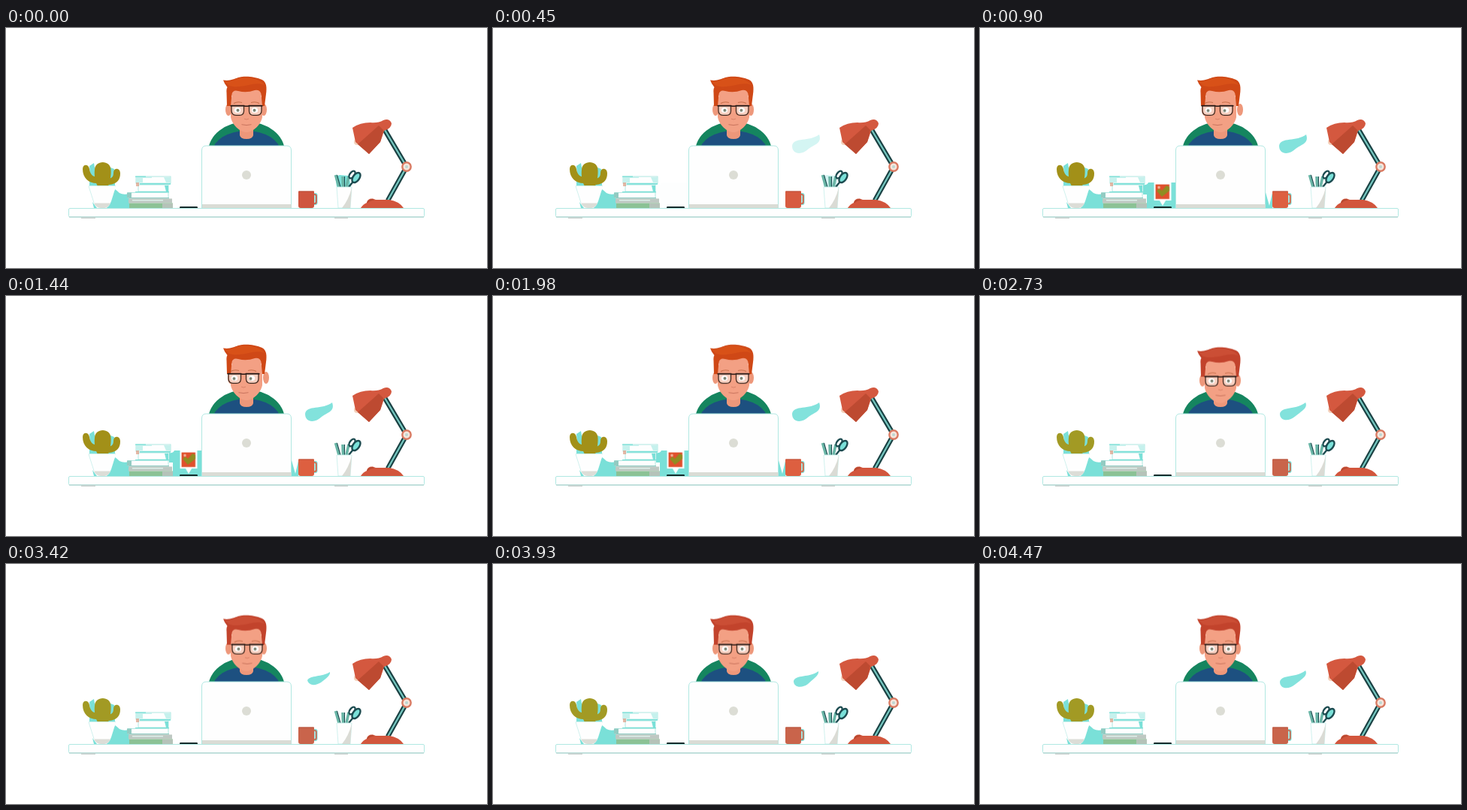
Animation, 640 px wide and 320 px high, one loop 4.5 s. Source, as an HTML page:

```html
<!DOCTYPE html>
<html lang="en">
<head>
<meta charset="utf-8">
<title>At the desk</title>
<style>
  html, body { margin: 0; width: 100%; height: 100%; overflow: hidden; background: #fff; }
  svg { display: block; width: 100vw; height: 100vh; }
  .anim * { animation: 4.5s linear infinite; }
  .teal { fill: #7ae0d8; }
  .edge { fill: #fefefe; stroke: #b0e8e2; stroke-width: 1; }
  .ink { fill: none; stroke: #1c4b50; }

  #head { animation-name: nod; animation-timing-function: ease-in-out; }
  @keyframes nod {
    0%, 42% { transform: none; }
    59%, 100% { transform: translateY(3.6px); }
  }
  #face { animation-name: turn; animation-timing-function: ease-in-out; }
  @keyframes turn {
    0%, 9% { transform: none; }
    18%, 34% { transform: translateX(-4px); }
    43%, 60% { transform: none; }
    76%, 87% { transform: translateX(.9px); }
    100% { transform: none; }
  }
  #ears { animation-name: ears; animation-timing-function: ease-in-out; }
  @keyframes ears {
    0%, 9% { transform: none; }
    18%, 34% { transform: translateX(3px); }
    43%, 100% { transform: none; }
  }
  #pupils { animation-name: glance; animation-timing-function: ease-in-out; }
  @keyframes glance {
    0%, 9% { transform: none; }
    16%, 34% { transform: translate(-1px, .4px); }
    42%, 100% { transform: none; }
  }
  .hair { animation-name: hair; }
  @keyframes hair {
    0%, 44% { fill: #cf4816; }
    60%, 100% { fill: #c2432c; }
  }
  .fringe { animation-name: fringe; }
  @keyframes fringe {
    0%, 44% { fill: #d85118; }
    60%, 100% { fill: #cb4e35; }
  }
  .cactus { animation-name: cactus; }
  @keyframes cactus {
    0%, 44% { fill: #a29018; }
    60%, 100% { fill: #a29a24; }
  }
  #mug { animation-name: mug; }
  @keyframes mug {
    0% { color: #cf553f; }
    18%, 44% { color: #dd5f40; }
    60%, 100% { color: #c9644b; }
  }
  #note { transform-origin: 243px 237px; animation-name: pop; animation-timing-function: ease-out; }
  @keyframes pop {
    0%, 11% { transform: scale(0); }
    15% { transform: scale(1.08); }
    17%, 49% { transform: none; }
    54%, 100% { transform: scale(0); }
  }
  #glow { animation-name: glow; }
  @keyframes glow {
    0%, 10% { opacity: 0; }
    15%, 49% { opacity: 1; }
    55%, 100% { opacity: 0; }
  }
  #bush { animation-name: bush; }
  @keyframes bush {
    0%, 6% { opacity: 1; }
    12%, 100% { opacity: 0; }
  }
  #leaf { fill: #82e2dc; animation-name: leaf, show; animation-timing-function: ease-in-out; }
  @keyframes show {
    0%, 8% { opacity: 0; }
    13%, 100% { opacity: 1; }
  }
  @keyframes leaf {
    0%, 44% { d: path("M398 157C400 145 421 152 434 142C438 154 428 155 420 161C411 170 398 169 398 157Z"); }
    60.7%, 99.3%, 100% { d: path("M399 157C401 147 421 152 433 142C437 149 427 154 420 160C411 168 399 167 399 157Z"); }
    76% { d: path("M401 155C405 148 420 151 431 144C432 149 425 153 419 158C411 163 403 162 401 155Z"); }
    87.3% { d: path("M400 156C403 147 421 152 433 143C434 149 426 153 419 160C411 166 400 165 400 156Z"); }
  }
</style>
</head>
<body>
<svg class="anim" viewBox="0 0 640 320" preserveAspectRatio="none">
  <!-- backdrop -->
  <g class="teal">
    <path d="M111 184L117 180L121 204L112 196ZM139 186L144 188V200L137 202ZM111 203H145V211H111Z"/>
    <path d="M145 215Q148 217 151 220Q156 223 164 221V240H134ZM115 232L121 240H117Z"/>
    <path id="glow" d="M217 209Q222 210 224 206H260V240H222V222H217ZM380 219L385 237L389 220V240H380Z"/>
    <path id="leaf" d="M398 157C400 145 421 152 434 142C438 154 428 155 420 161C411 170 398 169 398 157Z"/>
  </g>

  <!-- cactus -->
  <path class="cactus" d="M118 189C118 175.500 139.500 175.500 139.500 189C140 199 138 206 136 211H122C119 206 117 199 118 189Z"/>
  <path class="cactus" d="M102 188C102 181 110 181 111 188C112 195 115 198 121 199V207C110 207 102 200 102 188ZM152 194C152 186 143 186 143 193C143 198 141 200 137 201V209C147 208 152 203 152 194Z"/>
  <path fill="#fefefe" d="M109.500 210H146.500L140 231Q137 240 131 240H126Q119 240 116 231Z"/>
  <path fill="#dcddd7" d="M117 233.500H139Q136 240 131 240H126Q120 240 117 233.500Z"/>
  <path fill="none" stroke="#c4eeea" stroke-width=".8" d="M110 210.500H146M110 211L117 233"/>

  <!-- books -->
  <rect class="edge" x="173" y="198" width="46" height="9"/>
  <path fill="#c6f1ed" d="M173 198H194V200H182V206H173ZM210 199H219V206H213Z"/>
  <rect class="edge" x="176" y="209" width="40" height="9"/>
  <path class="teal" d="M172 197.500H186V198.700H172ZM178 207H219V208.700H178ZM211 210H216V218H213ZM172 218H217V219.500H172Z"/>
  <path fill="#dd9b80" opacity=".7" d="M173 206H177V211H173Z"/>
  <rect class="edge" x="162" y="219.500" width="54" height="7"/>
  <path fill="#92cbc2" d="M161 219.500H167V226.500H161ZM164 226H217V227.500H164Z"/>
  <rect x="163" y="227.500" width="58" height="6" fill="#bec8c2"/>
  <path fill="#dcefe9" d="M168 229H209V230.500H168Z"/>
  <rect x="164" y="233.500" width="58" height="6.500" fill="#8bc295"/>
  <path fill="#b5c3b9" d="M208 234H222V240H208Z"/>

  <!-- phone and message -->
  <rect x="231" y="238" width="24" height="2.400" rx="1.200" fill="#142a2a"/>
  <g id="note">
    <path fill="#fefefe" d="M231.500 206H254.500V230H247L243 237L239 230H231.500Z"/>
    <path fill="#e0502d" d="M233.500 208.500H252V228H233.500Z"/>
    <path fill="#908c22" d="M235 217L239 214L242 217L248 210L252 212V217L242 225Z"/>
    <circle cx="238" cy="212.500" r="1.800" fill="#f2b299"/>
  </g>

  <!-- person -->
  <ellipse cx="320" cy="165" rx="51" ry="40" fill="#15855f"/>
  <ellipse cx="320" cy="165" rx="45" ry="28" fill="#1d5080"/>
  <path fill="#ee977a" d="M311 128H329V143Q328 148 320 148Q312 148 311 143Z"/>
  <g id="head">
    <g id="ears" fill="#ee987b">
      <ellipse cx="296" cy="109" rx="4" ry="8"/>
      <ellipse cx="343" cy="109" rx="4" ry="8"/>
    </g>
    <path class="hair" d="M294 104L293.500 86Q293 81 294.500 79L291 74L289 69.500C298 71 303 68 309 66C318 63.500 331 65 338 68Q344 69 346 76Q347 81 346 88L344 104H340V90H300V104Z"/>
    <path fill="#f3a084" d="M299 104L300.500 88Q302 82 309 84Q320 87 331 83Q338 82 339.500 88L341 104V119C339 129 329 139 320 139C311 139 301 129 299 119Z"/>
    <path class="fringe" d="M290 70.500C299 73 303 69 310 67C320 65 337 67 344 76C331 70 315 82 297 77Z"/>
    <g id="face">
      <path fill="none" stroke="#c8704c" stroke-width="1.100" d="M303 100.500Q308 97.500 314 99.500M326 99.500Q332 97.500 337 100.500"/>
      <g fill="#fae0d5" fill-opacity=".75" stroke="#42291f" stroke-width="1.300">
        <path d="M300 103.500H316.500V111Q316 116.300 311 116.300H306Q300 116.300 300 110Z"/>
        <path d="M323.500 103.500H340V110Q340 116.300 334 116.300H329Q324 116.300 323.500 111Z"/>
        <path fill="none" stroke="#241714" stroke-width="1.500" d="M298.500 103.700H316.500Q320 104.800 323.500 103.700H341.500"/>
      </g>
      <g fill="#fff">
        <ellipse cx="308" cy="109.500" rx="4.200" ry="3.500"/>
        <ellipse cx="331" cy="109.500" rx="4.200" ry="3.500"/>
      </g>
      <g id="pupils" fill="#7b8474">
        <circle cx="308.500" cy="109.800" r="2"/>
        <circle cx="330.500" cy="109.800" r="2"/>
      </g>
      <path fill="none" stroke="#d9836a" stroke-width="1" d="M317 121Q320 123 323 121"/>
      <path fill="none" stroke="#c3705a" stroke-width=".9" d="M313.500 128.700Q320 130.500 326.500 128.700"/>
    </g>
  </g>

  <!-- laptop -->
  <path class="edge" d="M260.500 240V163Q260.500 157 266.500 157H373.500Q379.500 157 379.500 163V240Z"/>
  <rect x="261" y="235" width="118.500" height="5" fill="#dadcd5"/>
  <circle cx="320" cy="196" r="6" fill="#dcddd5"/>

  <!-- mug -->
  <g id="mug">
    <rect class="teal" x="406" y="220" width="8.500" height="16" rx="3"/>
    <rect x="406" y="222" width="6.800" height="12" rx="2" fill="#a5e5de" stroke="currentColor" stroke-width="1.700"/>
    <path fill="currentColor" d="M389 217.500H410V237Q410 240 407 240H392Q389 240 389 237Z"/>
    <path fill="none" stroke="#ae4935" stroke-width=".7" d="M390 218H409"/>
  </g>

  <!-- pens and scissors -->
  <path id="bush" class="teal" d="M438 198L444 196L456 197L459 212H440Z"/>
  <path fill="none" stroke="#69b5a6" stroke-width="3.600" d="M438.500 196L443 212M448 198L448.500 212M456 198L453 212"/>
  <path class="ink" stroke-width="1.100" d="M440.500 196L445 212M450.500 198V212"/>
  <g class="ink" stroke-width="2.400">
    <path d="M465 201L456 212"/>
    <ellipse cx="460.500" cy="195.500" rx="3" ry="5.500" transform="rotate(36 460.500 195.500)"/>
    <ellipse cx="466" cy="199.500" rx="4.200" ry="7.500" transform="rotate(36 466 199.500)" fill="#7ae0d8"/>
  </g>
  <path fill="#fefefe" stroke="#c4eeea" stroke-width=".8" d="M440 212H460L458 240H442Z"/>
  <path fill="#dadbd5" d="M460 213L458 240H447Q456 229 460 213Z"/>

  <!-- lamp -->
  <g fill="none">
    <path stroke="#1b4244" stroke-width="6.600" d="M504 136L533 185L508 230"/>
    <path stroke="#76c8c1" stroke-width="2.300" d="M504 136L533 185L508 230"/>
  </g>
  <circle cx="467" cy="152" r="4" fill="#f4d1bb"/>
  <path fill="#d4583f" d="M461 133Q471 126 485 126Q495 127 502 123Q510 120 513 127Q513 134 503 137Q501 144 498 152L483 168L465 152Z"/>
  <path fill="#bd4a31" d="M502 136Q500 146 498 152L483 168L468 155L496 130Z"/>
  <circle cx="533" cy="185" r="5.700" fill="#f6e5db" stroke="#d97a62" stroke-width="2.400"/>
  <circle cx="533" cy="185" r="2" fill="#bcd8d2"/>
  <path fill="#d2563d" d="M472 240Q475 235 480 233Q481 227 488 227.500L492 229H510Q523 231 529 240Z"/>
  <path fill="#b94930" d="M480 233Q482 228 488 228L490 229.500Q484 230 482 233Z"/>

  <!-- desk -->
  <rect class="edge" x="83.500" y="240.500" width="473" height="11.500" rx="1.500"/>
  <path stroke="#a8cbc7" d="M84 252H556"/>
  <path stroke="#c5cecb" stroke-width="1.600" d="M100 253.300H119M437 253.300H455"/>
</svg>
</body>
</html>
```
